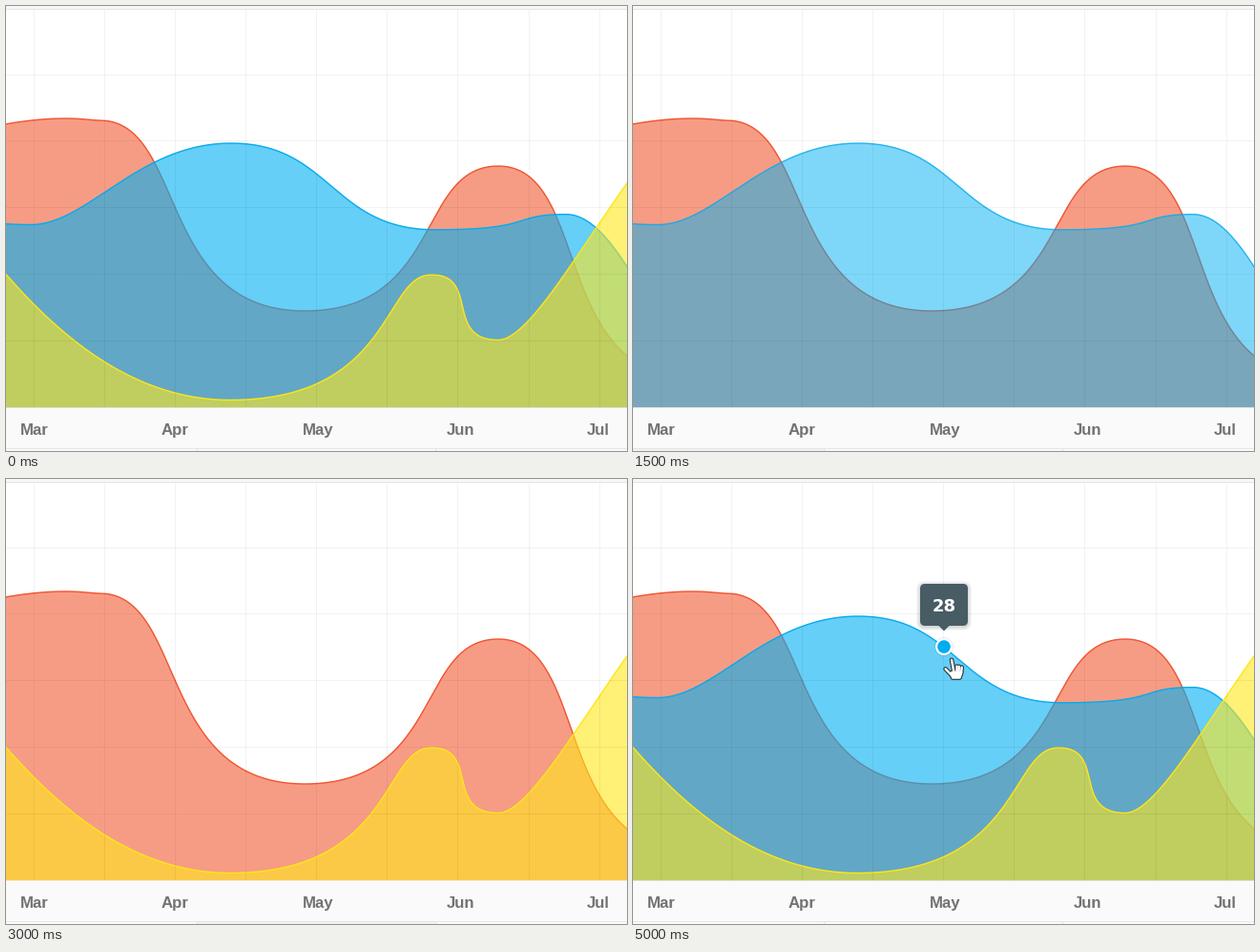
These frames come from a looping animation (651 by 467 pixels, 5100 ms). A matplotlib script:

```python
import numpy as np
import matplotlib.pyplot as plt
from matplotlib.animation import FuncAnimation
from matplotlib.patches import Circle, FancyBboxPatch, Polygon, Rectangle

W, H, DPI = 651, 467, 64
PX = 72 / DPI  # points per pixel
BASE = 421
FRAMES, STEP_MS, FADE = 51, 100, 6

fig = plt.figure(figsize=(W / DPI, H / DPI), dpi=DPI, facecolor="white")
ax = fig.add_axes([0, 0, 1, 1])
ax.set(xlim=(0, W), ylim=(H, 0))
ax.axis("off")


def rgb(*c):
    return tuple(v / 255 for v in c)


def rect(x, y, w, h, color, z=0, alpha=1):
    return ax.add_patch(Rectangle((x, y), w, h, fc=color, lw=0, zorder=z,
                                  alpha=alpha, antialiased=False))


def wave(*peaks):
    """Bezier curve through turning points (x, y, left handle, right handle)."""
    t = np.linspace(0, 1, 150)
    xs, ys = [], []
    for (x0, y0, _, out), (x1, y1, into, _) in zip(peaks, peaks[1:]):
        xs.append((1 - t) ** 3 * x0 + 3 * t * (1 - t) ** 2 * (x0 + out)
                  + 3 * t * t * (1 - t) * (x1 - into) + t ** 3 * x1)
        ys.append(y0 + (y1 - y0) * t * t * (3 - 2 * t))
    return np.concatenate(xs), np.concatenate(ys)


class Area:
    def __init__(self, xy, fill, line, z):
        self.fill = ax.fill_between(*xy, BASE + 0.2, color=fill, lw=0, zorder=z)
        self.line, = ax.plot(*xy, color=line, lw=1.4 * PX, zorder=z + 0.5)
        self.fade(1)

    def fade(self, a):
        self.fill.set_alpha(0.605 * a)
        self.line.set_alpha(a)


# Top strip, axis strip and the tabs below it
rect(0, 0, W, 3, rgb(247, 247, 247))
rect(0, 3, W, 1, rgb(229, 229, 229))
rect(0, BASE, W, H - BASE, rgb(250, 250, 250))
rect(0, 464, W, 1, rgb(230, 230, 230))
for x in (200, 450):
    rect(x, 465, 1, 2, rgb(226, 226, 226))
tab_yellow = rect(0, 465, 200, 2, "black", 1, 0)
tab_blue = rect(201, 465, 249, 2, "black", 1, 0)

for k in range(9):
    rect(int(29.6 + 74.06 * k), 4, 1, BASE - 4, "black", 9, 0.05)
for k in range(5):
    rect(0, int(72 + 69.8 * k), W, 1, "black", 9, 0.05)

for x, month in zip((30, 177.5, 327, 476.5, 620.5),
                    ("Mar", "Apr", "May", "Jun", "Jul")):
    ax.text(x, 450, month, ha="center", va="baseline", color=rgb(114, 114, 114),
            family="Liberation Sans", weight="bold", size=16.8 * PX)

red = Area(wave((-130, 145, 0, 60), (62, 118, 72, 20), (98, 120, 10, 91),
                (313, 320, 156, 146), (516, 168, 86, 97), (720, 390, 149, 0)),
           rgb(243, 92, 52), rgb(240, 84, 48), 2)
blue = Area(wave((-90, 222, 0, 45), (26, 229.5, 45, 60), (236, 144, 98, 105),
                 (450, 234.8, 109, 106), (587, 218.6, 59, 61),
                 (740, 380, 52, 0)),
            rgb(0, 176, 243), rgb(6, 170, 238), 3)
yellow = Area(wave((-120, 150, 0, 48), (235, 413.5, 201, 171),
                   (446, 282, 51, 51), (516, 350.5, 57, 53), (760, 90, 82, 0)),
              rgb(255, 231, 28), rgb(255, 230, 24), 4)

# Tooltip, marker and hand pointer, each with its full opacity
tip = []


def add_tip(artist, alpha=1):
    ax.add_artist(artist)
    tip.append((artist, alpha))


def tip_box(grow, dy, color, alpha, z):
    add_tip(FancyBboxPatch((301 - grow, 110 - grow + dy), 50 + 2 * grow,
                           44 + 2 * grow, fc=color, lw=0, zorder=z,
                           boxstyle=f"round,pad=0,rounding_size={5 + grow}"),
            alpha)


def tip_line(x, y, color, width, z):
    line, = ax.plot(x, y, color=color, lw=width * PX, zorder=z,
                    solid_capstyle="round")
    tip.append((line, 1))


SLATE, INK = rgb(72, 92, 101), rgb(35, 40, 45)
for grow in range(5):
    tip_box(grow, 1, "black", 0.035, 10)
tip_box(0, 0, SLATE, 1, 11)
add_tip(Polygon([(320, 153.5), (332, 153.5), (326, 159.5)], fc=SLATE, lw=0,
                zorder=11))
tip.append((ax.text(326, 138.8, "28", ha="center", va="baseline", color="white",
                    family="DejaVu Sans", weight="bold", size=18 * PX,
                    zorder=12), 1))
add_tip(Circle((326, 176), 10, fc="black", lw=0, zorder=11), 0.08)
add_tip(Circle((326, 176), 9, fc="white", lw=0, zorder=12))
add_tip(Circle((326, 176), 6.8, fc=rgb(0, 172, 240), lw=0, zorder=13))

# Hand: index finger, thumb, three folded fingers, palm
fingers = [((334, 336.5), (189.8, 203)), ((327.6, 334), (199.3, 206))]
fingers += [((338.9 + 2.9 * k, 338.9 + 2.6 * k), (196 + 0.8 * k, 203))
            for k in range(3)]
palm = [(334, 203), (344.3, 203), (342.5, 208.5), (335, 208.5)]
for color, width, z in ((INK, 4.6, 15), ("white", 2.5, 16)):
    for x, y in fingers:
        tip_line(x, y, color, width, z)
    add_tip(Polygon(palm, fc=color, ec=color, lw=width * PX, joinstyle="round",
                    zorder=z))


def ramp(i, start):
    return min(max((i - start + 1) / FADE, 0), 1)


def draw(i):
    y = 1 - ramp(i, 5) + ramp(i, 25)
    b = 1 - ramp(i, 15) + ramp(i, 35)
    yellow.fade(y)
    blue.fade(b)
    tab_yellow.set_alpha(0.03 * (1 - y))
    tab_blue.set_alpha(0.03 * (1 - b))
    shown = ramp(i, 45)
    for artist, alpha in tip:
        artist.set_alpha(alpha * shown)
    return []


anim = FuncAnimation(fig, draw, frames=FRAMES, interval=STEP_MS, repeat=True,
                     repeat_delay=0, init_func=lambda: draw(0))
plt.show()
```
